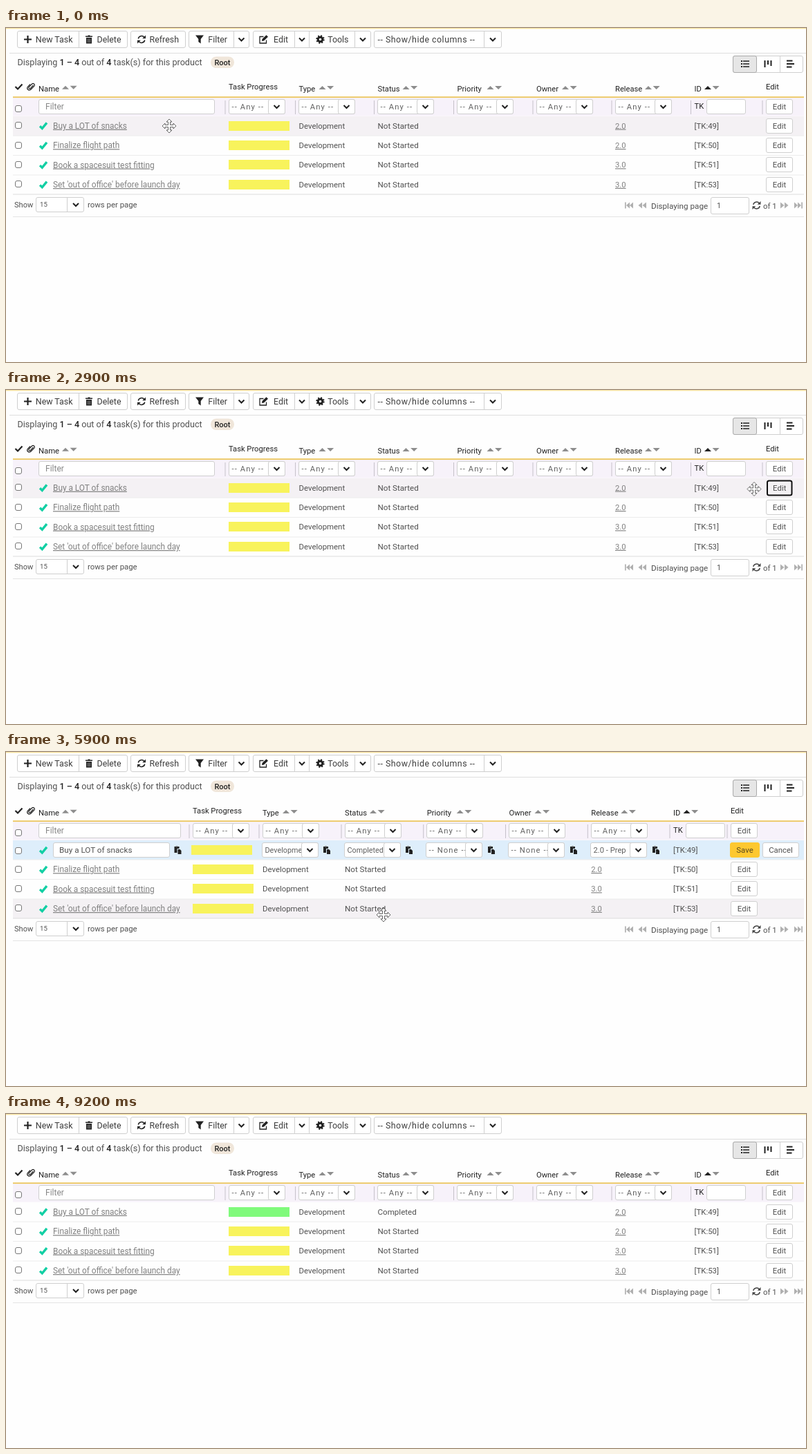
These frames come from a looping animation (1157 by 484 pixels, 9.5 s). An HTML page:

```html
<!DOCTYPE html>
<html lang="en">
<head>
<meta charset="utf-8">
<title>Task list</title>
<style>
html, body { margin: 0; width: 100%; height: 100%; overflow: hidden; background: #fefefe; }
svg { display: block; width: 100%; height: 100%; font-family: Roboto, "Open Sans", sans-serif; }
text { white-space: pre; }
</style>
</head>
<body>
<svg id="stage" viewBox="0 0 1157 484"></svg>
<script>
const LOOP = 9500, STEP = 100;
const INK = '#222', BODY = '#505050', LINE = '#cfcfcf';
const EDIT_AT = 3000, OPEN_AT = 4500, PICK_AT = 5900, SAVE_AT = 8500, LEAVE_AT = 9100;
const ROW_Y = [141.5, 170, 198.3, 226.8];
const ROW_EDGES = [128, 156, 184.5, 213, 241];
const TASKS = [
  ['Buy a LOT of snacks', '2.0', 49], ['Finalize flight path', '2.0', 50],
  ['Book a spacesuit test fitting', '3.0', 51], ["Set 'out of office' before launch day", '3.0', 53]
];
const HEADS = ['Task Progress', 'Type', 'Status', 'Priority', 'Owner', 'Release', 'ID', 'Edit'];
const SORT_OFFSET = [0, 34, 41, 48, 42, 48, 19.5];
const LIST_X = [322, 423.5, 537.5, 652.5, 767, 881, 995.5, 1099];
const EDIT_X = [270, 371, 490, 608.7, 727.5, 846.3, 965, 1048];
const OPTIONS = ['-- Please Select --', 'Not Started', 'In Progress', 'Completed', 'Blocked',
  'Deferred', 'Rejected', 'Duplicate', 'Under Review', 'Obsolete'];
// time, x, y of the pointer's centre
const PATH = [
  [0, 236, 142], [1100, 902, 142.5], [2200, 1108, 153], [2800, 1108, 153], [2900, 1082, 143.5],
  [4400, 558, 150], [4800, 558, 150], [5500, 546, 242], [5800, 546, 242], [5900, 546, 236],
  [6600, 561, 217], [7700, 1061, 152.5], [LOOP, 1061, 152.5]
];

const text = (x, y, s, size = 11.6, fill = BODY, more = '') =>
  `<text x="${x}" y="${y + size * 0.36}" font-size="${size}" fill="${fill}" ${more}>${s}</text>`;
const rect = (x, y, w, h, fill, more = '') =>
  `<rect x="${x}" y="${y}" width="${w}" height="${h}" fill="${fill}" ${more}/>`;
const box = (x, y, w, h, fill = '#fff', stroke = LINE, more = '') =>
  rect(x, y, w, h, fill, `rx="2.5" stroke="${stroke}" ${more}`);
const line = (x1, y1, x2, y2, color = LINE, w = 1) =>
  `<path d="M${x1} ${y1}L${x2} ${y2}" stroke="${color}" stroke-width="${w}"/>`;
const stroke = (x, y, d, color = INK, w = 2) =>
  `<path transform="translate(${x} ${y})" d="${d}" fill="none" stroke="${color}" stroke-width="${w}"/>`;
const shape = (x, y, d, fill = INK, more = '') =>
  `<path transform="translate(${x} ${y})" d="${d}" fill="${fill}" ${more}/>`;

const chevron = (x, y, up) => stroke(x, y, up ? 'M-4 2L0-2L4 2' : 'M-4-2L0 2L4-2', INK, 2);
const refresh = (x, y, color = INK) =>
  stroke(x, y, 'M-4.7-1A4.8 4.8 0 0 1 4-2.8M4.7 1A4.8 4.8 0 0 1-4 2.8', color, 1.5) +
  shape(x, y, 'M6-6V-1.2H1.2ZM-6 6V1.2H-1.2Z', color);
const copy = (x, y) => shape(x, y, 'M-5-5H2V-2H-1V4H-5Z') + shape(x, y, 'M0-1H3L5 1V6H0Z') +
  stroke(x, y, 'M-3-5H0', '#777', 1.5);
const tick = (x, y) => stroke(x, y, 'M-5 .8L-1.7 4L5-4.2', '#12cfa4', 3.4);
const checkbox = y => box(13.5, Math.floor(y) - 4.5, 9, 9, '#fff', '#777');
const progress = (x, y, fill) => rect(x, Math.round(y) - 7, 88, 14, fill);
const sorter = (x, y, active) =>
  shape(x, y, 'M-5 2.5L0-2.5L5 2.5Z', active ? INK : '#8d8d8d') + shape(x + 11.6, y, 'M-5-2.5L0 2.5L5-2.5Z', '#8d8d8d');
const button = (x, y, label, w = 38, fill = '#fff', color = BODY, edge = LINE, lw = 1) =>
  box(x + .5, Math.floor(y) - 10.5, w, 21, fill, edge, `stroke-width="${lw}"`) +
  text(x + .5 + w / 2, y, label, 11.4, color, 'text-anchor="middle"');

function select(x, y, label, open, size = 10.8, spacing = 0) {
  return box(x + .5, y - 10.5, 81, 21) +
    text(x + 4.5, y, label, size, '#606060', `letter-spacing="${spacing}"`) +
    box(x + 57.5, y - 10.5, 24, 21, open ? '#fdebbd' : '#fff') + chevron(x + 69.5, y, open);
}
const dashed = (x, y, word) => select(x, y, `-- ${word} --`, false, 11.2, 1.1);

function toolbar() {
  const label = (right, s) => text(right, 16.5, s, 12.4, '#3c3c3c', 'text-anchor="end"');
  const frame = (x, w, ...dividers) => box(x + .5, 4.5, w, 24) +
    dividers.map(d => line(d + .5, 4.5, d + .5, 28.5)).join('');
  return rect(0, 0, 1157, 1.3, '#f8e3a0') + line(5, 36.5, 1157, 36.5, '#dedede') +
    frame(16, 159, 105) + frame(180, 79) + frame(264, 87, 329) +
    frame(357, 170, 417, 438, 504) + frame(532, 184, 691) +
    stroke(31.5, 16.5, 'M-5.5 0H5.5M0-5.5V5.5', INK, 2.2) + label(96.5, 'New Task') +
    shape(120, 16.5, 'M-5-5H-2L-1-6H1L2-5H5V-3.5H-5ZM-4-2.5H4V6H-4Z') +
    stroke(120, 16.5, 'M-1.8-1V4.5M0-1V4.5M1.8-1V4.5', '#aaa', .7) + label(166.5, 'Delete') +
    refresh(196, 16.5) + label(250, 'Refresh') +
    shape(280, 16.5, 'M-6-6H6L1.7-.5V6L-1.7 3.5V-.5Z') + label(320, 'Filter') + chevron(340.5, 16.5) +
    stroke(372.5, 16.5, 'M0-4H-5.5V5.5H4V1', INK, 1.3) + shape(372.5, 16.5, 'M-2.5 2.5L-2-.5L4-6.2L6.5-3.7L.5 2Z') +
    label(408, 'Edit') + chevron(428, 16.5) +
    `<g transform="translate(454.5 16.5)" fill="none" stroke="${INK}"><circle r="3.3" stroke-width="3"/>` +
    '<circle r="5.2" stroke-width="2" stroke-dasharray="2.04"/></g>' +
    label(495.5, 'Tools') + chevron(516, 16.5) +
    text(537.5, 16.5, '-- Show/hide columns --', 12.4, '#3c3c3c', 'letter-spacing=".5"') + chevron(704, 16.5);
}

function summary() {
  const bold = s => `<tspan font-weight="500" fill="${INK}">${s}</tspan>`;
  return text(16.5, 49.5, `Displaying ${bold('1 – 4')} out of ${bold('4')} task(s) for this product`, 12.6) +
    rect(296, 41.5, 34, 16.5, '#f0e6da', 'rx="8"') +
    text(313, 49.8, 'Root', 11, INK, 'text-anchor="middle" font-weight="500"') +
    box(1051.5, 40.5, 101, 24) + box(1051.5, 40.5, 34, 24, '#e6e6e6', '#aaa') + line(1119.5, 40.5, 1119.5, 64.5) +
    stroke(1069, 52, 'M-3-4H6M-3 0H6M-3 4H6', INK, 1.6) + stroke(1069, 52, 'M-6-4H-4M-6 0H-4M-6 4H-4', INK, 2) +
    stroke(1102, 52, 'M-4.5-5V5M0-5V1M4.5-5V3', INK, 2) +
    stroke(1134.5, 52, 'M-5.5-4.5H3M-5.5 0H5.5M-5.5 4.5H2', INK, 1.8);
}

function header(cols, editing) {
  let out = rect(10, 101, 1144, 26.5, '#f7f2fa') + rect(10, 99.3, 1144, 1.8, '#ecc65c') +
    stroke(18.5, 85, 'M-5 0L-1.5 3.5L5-3.5', INK, 2.2) +
    stroke(36, 85, 'M3.5-2L-1 3A1.6 1.6 0 0 1-3 .8L1.6-4A2.3 2.3 0 0 1 5-1L-.5 4.5A3 3 0 0 1-4.8 .5L-1-3.5', INK, 1.2) +
    text(47, 87.5, 'Name', 11.3, INK) + sorter(86, 86.3) +
    checkbox(117) + box(47.5, 103.5, editing ? 205 : 254, 21) + text(57, 114, 'Filter', 12, '#888');
  cols.forEach((x, i) => {
    const plain = i === 0 || i === 7;
    out += text(x, plain ? 85.2 : 87.5, HEADS[i], 11.2, INK) + line(x - 5, 105, x - 5, 125, '#c6c1ca');
    if (!plain) out += sorter(x + SORT_OFFSET[i], 86.5, i === 6);
    if (i < 6) out += dashed(Math.floor(x), 114, 'Any');
  });
  return out + text(cols[6], 112.5, 'TK', 11.2, INK) + box(Math.floor(cols[6]) + 18.5, 103.5, 56, 21) +
    button(cols[7], 114, 'Edit');
}

function taskRow(i, cols, state) {
  const [name, release, id] = TASKS[i], y = ROW_Y[i], done = i === 0 && state.saved;
  const link = 'text-decoration="underline"';
  const focus = i === 0 && state.focus;
  return (state.hover === i ? rect(10, ROW_EDGES[i], 1144, ROW_EDGES[i + 1] - ROW_EDGES[i], '#f4f1f4') : '') +
    checkbox(y) + tick(54, y) + text(68, y, name, 11.85, '#808080', link) +
    progress(cols[0], y, done ? '#80fa7c' : '#f8f35c') +
    text(cols[1], y, 'Development', 11.4) + text(cols[2], y, done ? 'Completed' : 'Not Started') +
    text(cols[5], y, release, 11.2, '#808080', link) + text(cols[6], y, `[TK:${id}]`, 11.4) +
    (focus ? button(cols[7] + 1.5, 142, 'Edit', 35.5, '#f3f1f3', BODY, '#111', 2) : button(cols[7], Math.round(y), 'Edit'));
}

function editRow(cols, state) {
  const y = 142, x = cols.map(Math.floor);
  const save = state.saveHover
    ? button(1048, y, 'Save', 40, '#fde7c3', '#f58a3c', state.saveFocus ? '#111' : '#fdc830', state.saveFocus ? 2 : 1)
    : button(1047, y, 'Save', 42, '#fdc830', '#5a4a20', '#fdc830');
  return rect(10, 128, 1144, 28, '#deeefb') + checkbox(143) + tick(54, y) +
    box(68.5, 131.5, 168, 21) + text(77, y, TASKS[0][0], 11.7) + copy(248.5, y) +
    progress(268, y, '#f8f35c') +
    select(x[1] - 1, y, 'Developme') + select(x[2] - 1, y, state.picked ? 'Completed' : 'Not Started', state.open) +
    dashed(x[3] - 1, y, 'None') + dashed(x[4] - 1, y, 'None') + select(x[5] - 1, y, '2.0 - Prep', false, 11.2) +
    [464, 583, 702, 821, 940].map(cx => copy(cx, y)).join('') +
    text(cols[6], y, '[TK:49]', 11.4) + save + button(1094, y, 'Cancel', 52);
}

function pager() {
  const gray = '#b0b0b0', y = 257;
  return line(10, 273.5, 1154, 273.5, '#e4e4e4') + text(12, 256, 'Show', 11.1) +
    box(43.5, 245.5, 69, 21) + text(49, 256, '15', 9.6) + line(88.5, 245.5, 88.5, 266.5) + chevron(101, 256) +
    text(118, 256, 'rows per page', 11.4) +
    shape(901, y, 'M-6-4.5H-4.3V4.5H-6ZM1-4.5V4.5L-4 0ZM6-4.5V4.5L1 0Z', gray) +
    shape(920, y, 'M0-4.5V4.5L-5.5 0ZM6-4.5V4.5L.5 0Z', gray) +
    text(933, 257.5, 'Displaying page', 11.7) + box(1019.5, 245.5, 55, 24) + text(1028, 257.5, '1', 10.8) +
    refresh(1085.5, y, '#444') + text(1095, 257.5, 'of 1', 11.4) +
    shape(1126, y, 'M0-4.5V4.5L5.5 0ZM-6-4.5V4.5L-.5 0Z', gray) +
    shape(1146, y, 'M6-4.5H4.3V4.5H6ZM-1-4.5V4.5L4 0ZM-6-4.5V4.5L-1 0Z', gray);
}

function menu(hoverY) {
  const step = 21.65;
  return box(443.5, 154.5, 126.5, 226, '#fff', '#c4c4c4', 'style="filter:drop-shadow(0 2px 3px #0003)"') +
    OPTIONS.map((s, i) => {
      const y = 170 + i * step, over = Math.abs(hoverY - y) < step / 2;
      return (over ? rect(444, y - step / 2, 125.5, step, '#fdebbd') : '') + text(450.5, y, s, 10.9);
    }).join('');
}

function pointer(x, y, hand) {
  const outline = 'stroke="#555" stroke-width=".9" stroke-linejoin="round"';
  return hand
    ? shape(x, y, 'M-3.5-8.5Q-2-10-.8-8.5V-3Q1-4 2-2.3Q3.6-3 4.3-1.4Q6.2-1.8 6.3 0V4Q6 6 5 7V9H-2.5V7L-6.5 1.5Q-6.5-.5-4.5 .2L-3.5 1.5Z', '#fff', outline) +
      stroke(x, y, 'M-.8-3V0M2-2.3V.4M4.3-1.4V.8', '#444', .8)
    : shape(x, y, 'M0-10L4-6H1.5V-1.5H6V-4L10 0L6 4V1.5H1.5V6H4L0 10L-4 6H-1.5V1.5H-6V4L-10 0L-6-4V-1.5H-1.5V-6H-4Z', '#fff', outline);
}

function pointerAt(t) {
  const i = PATH.findIndex((p, k) => k > 0 && t <= p[0]);
  const [t0, x0, y0] = PATH[i - 1], [t1, x1, y1] = PATH[i];
  const u = (t - t0) / (t1 - t0), e = u * u * (3 - 2 * u);
  return [x0 + (x1 - x0) * e, y0 + (y1 - y0) * e];
}

function render(t) {
  const [x, y] = pointerAt(t);
  const editing = t >= EDIT_AT && t < SAVE_AT, open = t >= OPEN_AT && t < PICK_AT;
  const cols = editing ? EDIT_X : LIST_X;
  const present = t < LEAVE_AT;
  const saveHover = editing && t > 7000 && x > 1050;
  const state = {
    open, saveHover,
    picked: t >= PICK_AT, saved: t >= SAVE_AT,
    focus: t >= 2400 && t < EDIT_AT, saveFocus: t >= 7900,
    hover: present && !open ? ROW_EDGES.findIndex((edge, i) => y >= edge && y < ROW_EDGES[i + 1]) : -1
  };
  const hand = saveHover || open || (!editing && x > 1100) || (editing && t < OPEN_AT && x < 572);
  let out = rect(0, 0, 1157, 484, '#fefefe') + toolbar() + summary() + header(cols, editing);
  TASKS.forEach((_, i) => { out += i === 0 && editing ? editRow(cols, state) : taskRow(i, cols, state); });
  ROW_EDGES.slice(1).forEach((edge, i) => { out += line(10, edge, 1154, edge, i === 3 ? '#dcdcdc' : '#ececec'); });
  out += pager();
  if (open) out += menu(y - 8);
  if (present) out += pointer(x, y, hand);
  return out;
}

const stage = document.getElementById('stage');
const start = performance.now();
let shown = -1;
function tickFrame() {
  const t = Math.floor(((performance.now() - start) % LOOP) / STEP) * STEP;
  if (t !== shown) stage.innerHTML = render(shown = t);
  requestAnimationFrame(tickFrame);
}
tickFrame();
</script>
</body>
</html>
```
